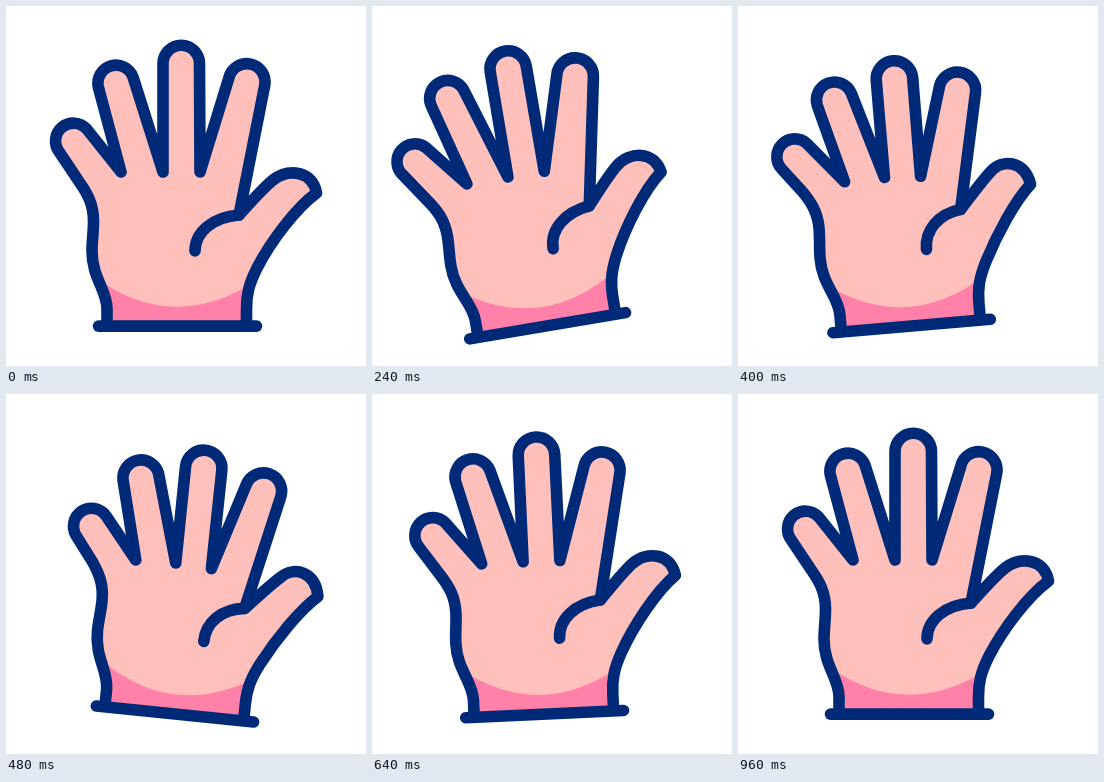
Animation, 360 px wide and 360 px high, one loop 2000 ms. Source, as an HTML page:

```html
<!DOCTYPE html>
<html lang="en">
<head>
<meta charset="utf-8">
<title>Waving hand</title>
<style>
  html, body { margin: 0; width: 100%; height: 100%; overflow: hidden; background: #fff; }
  svg { display: block; width: 100vw; height: 100vh; }
</style>
</head>
<body>
<svg viewBox="0 0 360 360">
  <defs><clipPath id="palm"><path id="mask"/></clipPath></defs>
  <g id="hand" stroke-width="11.6" stroke-linecap="round" stroke-linejoin="round">
    <path id="skin" fill="#ffc0bb"/>
    <path d="M90 272Q168 328 250 275V320H90Z" fill="#ff80a9" clip-path="url(#palm)"/>
    <g fill="none" stroke="#002a78">
      <path id="outline"/>
      <path id="crease"/>
      <path d="M92.5 320.1H250.5"/>
    </g>
  </g>
</svg>
<script>
const LOOP = 2000, STEP = 40;
const $ = id => document.getElementById(id);

// Time, angle and easing used to arrive there
const sine = u => (1 - Math.cos(Math.PI * u)) / 2;
const easeOut = u => 1 - (1 - u) ** 2;
const swings = [
  [0, 0, sine],
  [320, -11.2, sine],
  [525, 8, sine],
  [680, -4.6, sine],
  [960, 0, easeOut]
];

function angleAt(t) {
  for (let i = 1; i < swings.length; i++) {
    const [t0, a0] = swings[i - 1], [t1, a1, ease] = swings[i];
    if (t < t1) return a0 + (a1 - a0) * ease((t - t0) / (t1 - t0));
  }
  return 0;
}

// How far the fingers are drawn in, 0 to 1
function curlAt(t) {
  const u = (t - 160) / 570;
  return u > 0 && u < 1 ? Math.sin(Math.PI * u) ** 2 : 0;
}

// Builds a point formatter: rest position plus its shift at full curl
const pointAt = curl => (x, y, dx = 0, dy = 0) =>
  `${(x + dx * curl).toFixed(2)} ${(y + dy * curl).toFixed(2)}`;

function handPath(at) {
  const valley = (x, dx, dy) => `L${at(x, 166, dx, dy)}`;
  const tip = (x0, y0, x1, y1, r, dx, dy) =>
    `L${at(x0, y0, dx, dy)}A${r} ${r} 0 0 1 ${at(x1, y1, dx, dy)}`;
  return [
    'M101 318V303C101 284 86 272 86 245C86 235 87.5 226 87.5 215C87.5 198 81 187 74 177',
    tip(53.3, 146, 80.7, 123, 17.9, 2, 7),
    valley(115, 2, 5),
    tip(92.3, 81, 127, 71, 18.1, 4, 12),
    valley(157, 0, 4),
    tip(157, 57.5, 193.5, 57.5, 18.25, 0, 16),
    valley(194, -1, 6),
    tip(223, 71.5, 258.7, 79.5, 18.3, -4, 14),
    `L${at(233, 209, -3, -1)}`,
    `C${at(245, 196, -3, -1)} ${at(256, 183, -3, -1)} ${at(267, 174, -4, -1)}`,
    `C${at(283, 162, -8, -1)} ${at(307, 165, -10, -1)} ${at(310.5, 187, -9, 2)}`,
    `C${at(290, 202, -5, 2)} 265 235 251 262C243 278 240.5 288 240.5 303V318`
  ].join('');
}

const creasePath = at =>
  `M${at(233, 209, -3, -1)}C${at(207, 211)} ${at(189, 226, 4)} ${at(189, 245, 4)}`;

function draw(t) {
  const at = pointAt(curlAt(t)), d = handPath(at);
  for (const id of ['skin', 'mask', 'outline']) $(id).setAttribute('d', d);
  $('crease').setAttribute('d', creasePath(at));
  $('hand').setAttribute('transform', `rotate(${angleAt(t).toFixed(3)} 171.5 295)`);
}

const start = performance.now();
function tick() {
  const t = (performance.now() - start) % LOOP;
  draw(Math.floor(t / STEP) * STEP);
  requestAnimationFrame(tick);
}
tick();
</script>
</body>
</html>
```
